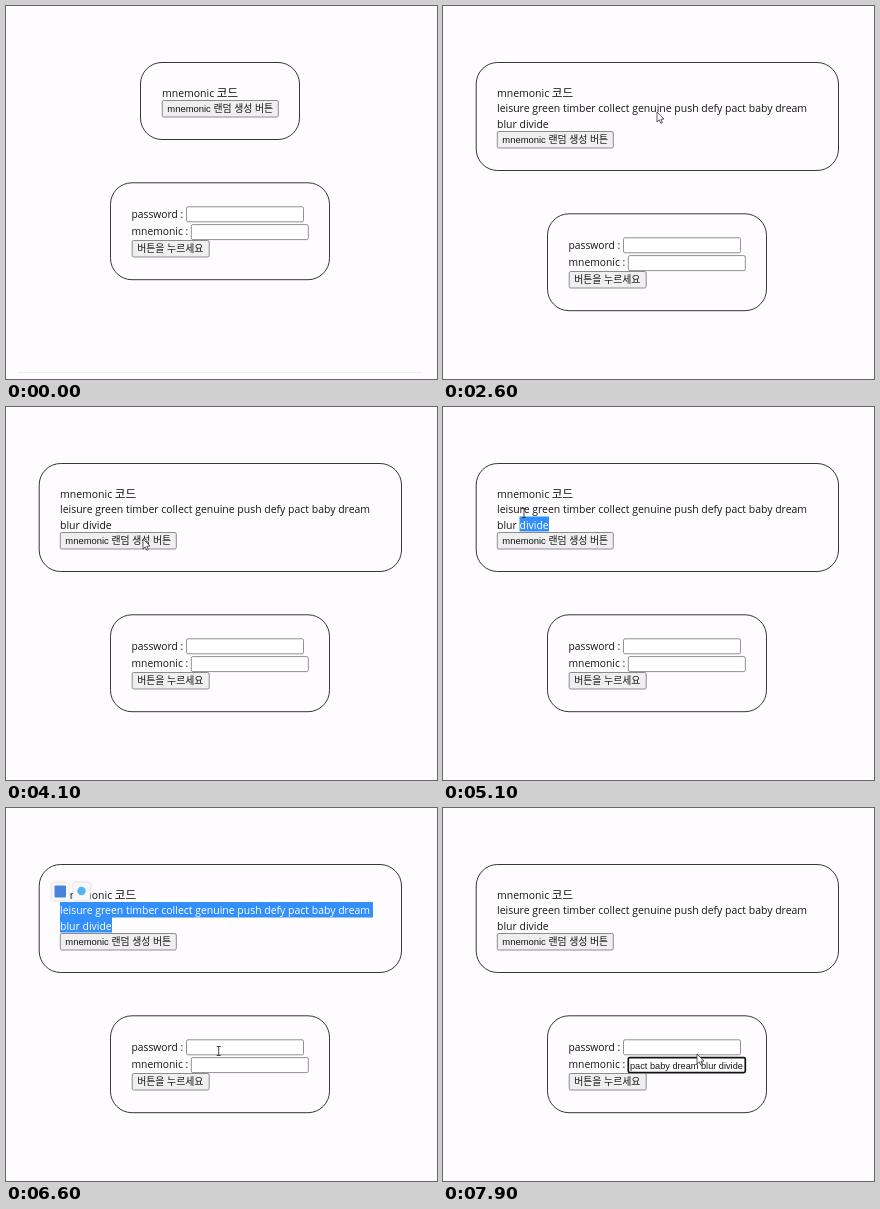
An HTML page with a canvas for the animation above (8000 ms loop, 431 by 373 pixels).

```html
<!DOCTYPE html>
<html lang="ko">
<head>
<meta charset="utf-8">
<style>
html, body { margin: 0; width: 100%; height: 100%; overflow: hidden; background: #fefcff; }
canvas { display: block; width: 431px; height: 373px; }
</style>
</head>
<body>
<canvas id="stage"></canvas>
<script>
const W = 431, H = 373, LOOP = 8000, STEP = 100;
const canvas = document.getElementById('stage');
const ctx = canvas.getContext('2d');
const dpr = window.devicePixelRatio || 1;
canvas.width = W * dpr;
canvas.height = H * dpr;

const BODY = '10.48px "Open Sans", "Noto Sans", sans-serif';
const LABEL = '10.3px "Open Sans", "Noto Sans", sans-serif';
const BODY_KO = '11.6px "Noto Sans CJK KR", "Noto Sans CJK", sans-serif';
const FORM = '9.45px "Liberation Sans", Arial, sans-serif';
const FORM_KO = '9.9px "Noto Sans CJK KR", "Noto Sans CJK", sans-serif';
const FIELD = '9.2px "Liberation Sans", Arial, sans-serif';
const PAPER = '#fefcff', INK = '#141416', BLUE = '#338ffc';

const LINE1 = 'leisure green timber collect genuine push defy pact baby dream';
const LINE2 = 'blur divide';
const PASTED = 'pact baby dream blur divide';

const HOVER = 1500, CLICK = 2600, DRAG = 4900, POPUP = 5800,
      CLEAR = 6700, FOCUS = 6900, PASTE = 7700;

// time, x, y of the pointer
const path = [
  [2600, 214, 106], [3100, 175, 143], [3400, 175, 143], [3800, 168, 147],
  [4400, 106, 117], [4600, 104, 117], [4900, 104, 117], [5100, 81, 106],
  [5400, 57, 102], [5900, 57, 102], [6500, 212.7, 243], [6600, 212.7, 243],
  [6900, 232, 257], [7500, 240, 257], [7800, 254, 246], [8000, 254, 246]
];
// time and left edge of the selection on the second line
const drag = [[4900, 106], [5100, 76.5], [5300, 54]];

function at(keys, t, i) {
  if (t <= keys[0][0]) return keys[0][i];
  for (let k = 1; k < keys.length; k++) {
    const a = keys[k - 1], b = keys[k];
    if (t <= b[0]) {
      const p = (t - a[0]) / (b[0] - a[0]);
      return a[i] + (b[i] - a[i]) * p * p * (3 - 2 * p);
    }
  }
  return keys[keys.length - 1][i];
}

function box(x, y, w, h, r, fill, stroke, line = 1) {
  ctx.beginPath();
  ctx.roundRect(x, y, w, h, r);
  if (fill) { ctx.fillStyle = fill; ctx.fill(); }
  if (stroke) { ctx.strokeStyle = stroke; ctx.lineWidth = line; ctx.stroke(); }
}

function panel(x, y, w, h) {
  box(x, y, w, h, 21.5, null, '#2c2c2e', 0.95);
}

// Latin and Hangul runs use their own fonts
function text(str, x, y, latin = BODY, hangul = BODY_KO, color = INK) {
  ctx.fillStyle = color;
  for (const run of str.match(/[가-힣]+|[^가-힣]+/g)) {
    ctx.font = /[가-힣]/.test(run) ? hangul : latin;
    ctx.fillText(run, x, y);
    x += ctx.measureText(run).width;
  }
}

function phrase(color) {
  text(LINE1, 54, 106.2, BODY, BODY_KO, color);
  text(LINE2, 54, 121.8, BODY, BODY_KO, color);
}

function button(label, x, y, w, hover) {
  box(x, y, w, 16.5, 1.5, hover ? '#e2e2e4' : '#efeff0', hover ? '#5c5c5e' : '#808082', 0.9);
  text(label, x + 5, y + 11.9, FORM, FORM_KO);
}

function input(x, y, focused) {
  box(x, y, 117, 15, 1.5, '#fff', focused ? '#111' : '#858588', focused ? 1.7 : 0.9);
}

function generator(made, hover) {
  const x = made ? 54 : 156;
  if (made) panel(33.2, 56.5, 362.3, 108);
  else panel(134.5, 56.5, 159, 77);
  text('mnemonic 코드', x, 91);
  if (made) phrase(INK);
  button('mnemonic 랜덤 생성 버튼', x + 0.3, made ? 125.5 : 94.5, 116, hover);
}

function login(dy, focused, pasted) {
  ctx.save();
  ctx.translate(0, dy);
  panel(104.5, 176.8, 219, 96.9);
  text('password :', 125.5, 211.5, LABEL);
  input(180.5, 200.8, false);
  text('mnemonic :', 125.5, 229, LABEL);
  input(185.3, 218.6, focused);
  if (pasted) text(PASTED, 187, 229.5, FIELD);
  button('버튼을 누르세요', 126.2, 234.5, 77);
  ctx.restore();
}

function highlight(t) {
  const left = at(drag, t, 1), full = t >= 5400;
  ctx.save();
  ctx.beginPath();
  ctx.rect(left, 109.5, 106 - left, 15);
  if (full) ctx.rect(54, 94, 313, 15.5);
  ctx.clip();
  ctx.fillStyle = BLUE;
  ctx.fillRect(50, 90, 330, 40);
  phrase('#fff');
  ctx.restore();
}

function popup() {
  for (const x of [45.5, 67]) {
    ctx.save();
    ctx.shadowColor = 'rgba(0,0,0,.25)';
    ctx.shadowBlur = 2 * dpr;
    box(x, 74.5, 17.5, 18, 2, '#f8f8fb');
    ctx.restore();
  }
  box(48.5, 77.5, 11.5, 12, 1, '#4a83dc');
  ctx.beginPath();
  ctx.arc(75.5, 83, 4.2, 0, 7);
  ctx.fillStyle = '#55b4ee';
  ctx.fill();
}

function arrow(x, y) {
  const pts = [[0, 0], [0, 10], [2.3, 7.9], [3.9, 11.3], [5.4, 10.6], [3.9, 7.3], [7, 7]];
  ctx.beginPath();
  for (const [px, py] of pts) ctx.lineTo(x + px, y + py);
  ctx.closePath();
  ctx.fillStyle = '#fff';
  ctx.fill();
  ctx.strokeStyle = '#333';
  ctx.lineWidth = 0.8;
  ctx.stroke();
}

function beam(x, y) {
  ctx.beginPath();
  for (const s of [-1, 1]) {
    ctx.moveTo(x - 2, y + 4.5 * s);
    ctx.lineTo(x + 2, y + 4.5 * s);
  }
  ctx.moveTo(x, y - 4.5);
  ctx.lineTo(x, y + 4.5);
  ctx.strokeStyle = '#333';
  ctx.lineWidth = 0.9;
  ctx.stroke();
}

function draw(t) {
  const made = t >= CLICK;
  ctx.setTransform(dpr, 0, 0, dpr, 0, 0);
  ctx.fillStyle = PAPER;
  ctx.fillRect(0, 0, W, H);
  generator(made, t >= HOVER && !made);
  login(made ? 31 : 0, t >= FOCUS, t >= PASTE);
  if (!made) {
    ctx.fillStyle = '#eeecf0';
    ctx.fillRect(12, 366, 404, 1);
    return;
  }
  if (t >= DRAG && t < CLEAR) highlight(t);
  if (t >= POPUP && t < CLEAR) popup();
  const x = at(path, t, 1), y = at(path, t, 2);
  const overText = t >= 4300 && t < 7600;
  (overText ? beam : arrow)(x, y);
}

const start = performance.now();
function tick() {
  const t = (performance.now() - start) % LOOP;
  draw(Math.floor(t / STEP) * STEP);
  requestAnimationFrame(tick);
}
tick();
</script>
</body>
</html>
```
